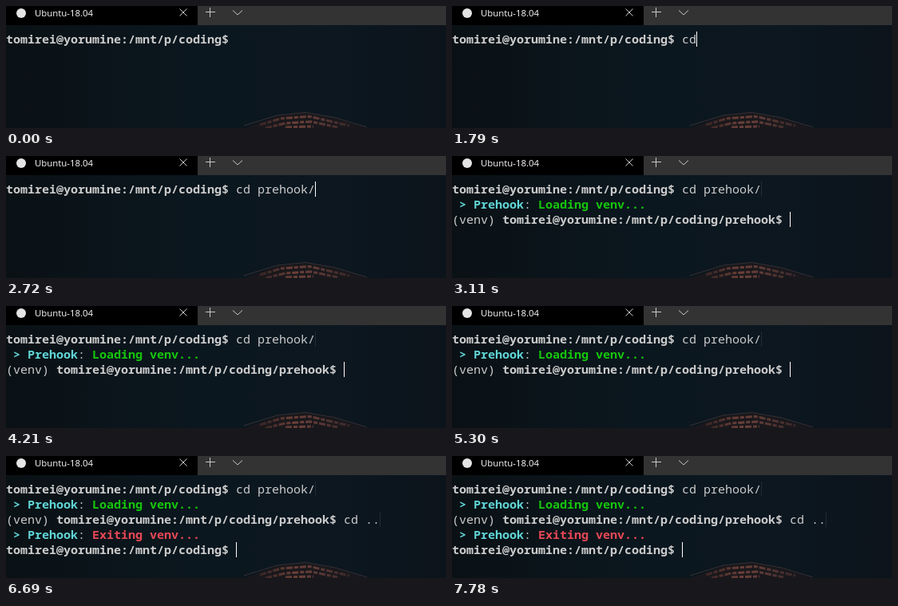
These frames come from a looping animation (551 by 153 pixels, 8 s). An HTML page:

```html
<!DOCTYPE html>
<html lang="en">
<head>
<meta charset="utf-8">
<title>Terminal</title>
<style>
  html, body { margin: 0; width: 100%; height: 100%; overflow: hidden; background: #0b151b; }
  #stage { position: relative; width: 551px; height: 153px; overflow: hidden; }
  #stage > svg { position: absolute; left: 0; top: 0; }
  .title { font: 11.4px "Open Sans", "Noto Sans", sans-serif; fill: #fff; }
  .row {
    position: absolute; left: 0; height: 19px;
    font: 500 15px/19px "Noto Sans Mono", "DejaVu Sans Mono", monospace;
    white-space: pre; color: #ccc; font-variant-ligatures: none;
  }
  .row b { font-weight: 600; }
  .cyan { color: #61d6d6; }
  .green { color: #16c60c; }
  .red { color: #e74856; }
  .bar { position: absolute; width: 1px; height: 19px; background: #fff; }
  .trace { opacity: .09; }
</style>
</head>
<body>
<div id="stage">
  <svg width="551" height="153" viewBox="0 0 551 153">
    <defs>
      <linearGradient id="sky" x1="0" y1="0" x2="1" y2="0">
        <stop offset="0" stop-color="#0a1115"/>
        <stop offset=".45" stop-color="#0b171f"/>
        <stop offset=".75" stop-color="#0c1720"/>
        <stop offset="1" stop-color="#0c131b"/>
      </linearGradient>
      <linearGradient id="lamps" gradientUnits="userSpaceOnUse" x1="305" y1="0" x2="445" y2="0">
        <stop offset="0" stop-color="#2a1d1f"/>
        <stop offset=".4" stop-color="#6a4038"/>
        <stop offset=".6" stop-color="#5c3a36"/>
        <stop offset="1" stop-color="#2c2124"/>
      </linearGradient>
    </defs>
    <rect width="551" height="153" fill="url(#sky)"/>

    <!-- building -->
    <path d="M300 153 340 138 375 134 412 141 450 153Z" fill="#1a181c"/>
    <path d="M298 150 340 137 375 133.500 412 140 452 152" fill="none" stroke="#3a3032"/>
    <path d="M318 149 345 141 380 138.500 430 150M325 153 350 147 382 145 415 152M350 152 385 151"
      fill="none" stroke="url(#lamps)" stroke-width="3" stroke-dasharray="8 2 5 2"/>

    <!-- tab bar -->
    <rect width="551" height="24" fill="#333"/>
    <rect width="240" height="24" fill="#000"/>
    <circle cx="19" cy="9" r="6" fill="#e4e4e4"/>
    <text class="title" x="36" y="13">Ubuntu-18.04</text>
    <g fill="none" stroke="#c8c8c8">
      <path d="M217.500 3.500l9 9m0-9l-9 9"/>
      <path d="M250 7.500h12M255.500 2v12"/>
      <path d="M284 5.500l6 5.500l6-5.500"/>
    </g>
  </svg>
</div>
<script>
const CELL = 9, LINE = 19, TOP = 32, LOOP = 8000;
const HOME = 'tomirei@yorumine:/mnt/p/coding';
// [plain lead, bold prompt]
const PROMPTS = [['', HOME + '$ '], ['(venv) ', HOME + '/prehook$ '], ['', HOME + '$ ']];
const stage = document.getElementById('stage');

// [time, text typed so far]
const TYPED = [
  [[1710, 'c'], [1790, 'cd'], [1860, 'cd '], [1940, 'cd p'], [2020, 'cd pre'], [2180, 'cd preh'],
   [2330, 'cd preho'], [2490, 'cd prehoo'], [2650, 'cd prehook'], [2720, 'cd prehook/']],
  [[6000, 'c'], [6070, 'cd'], [6150, 'cd '], [6300, 'cd .'], [6460, 'cd ..']],
  []
];
const STARTS = [0, 3110, 6690];
// the cursor toggles at each of these times, hidden at first
const BLINKS = [300, 840, 1390, 3660, 4210, 4750, 5300, 5840, 6000, 7310, 7780];

function add(cls, row, col = 0, html = '') {
  const el = document.createElement('div');
  el.className = cls;
  el.style.top = TOP + row * LINE + 'px';
  el.style.left = col * CELL + 'px';
  el.innerHTML = html;
  return stage.appendChild(el);
}

const notice = (row, color, text) => add('row', row, 0,
  ` <b class="cyan">&gt; Prehook</b>: <b class="${color}">${text}</b>`);

const prompts = PROMPTS.map(([lead, bold], i) =>
  add('row', i * 2, 0, `${lead}<b>${bold}</b><span></span>`));
const notices = [notice(1, 'green', 'Loading venv...'), notice(3, 'red', 'Exiting venv...')];
const traces = [add('bar trace', 0, 43), add('bar trace', 2, 52)];
const cursor = add('bar', 0);

const show = (el, on) => { el.style.visibility = on ? 'visible' : 'hidden'; };

function draw(t) {
  const step = STARTS.filter(s => s <= t).length - 1;
  prompts.forEach((el, i) => {
    const last = TYPED[i].filter(k => k[0] <= t).pop();
    el.lastChild.textContent = last ? last[1] : '';
    show(el, i <= step);
  });
  notices.forEach((el, i) => {
    show(el, i < step);
    show(traces[i], i < step);
  });
  cursor.style.left = prompts[step].textContent.length * CELL + 'px';
  cursor.style.top = TOP + step * 2 * LINE + 'px';
  show(cursor, BLINKS.filter(b => b <= t).length % 2);
}

function tick() {
  draw(performance.now() % LOOP);
  requestAnimationFrame(tick);
}
tick();
</script>
</body>
</html>
```
